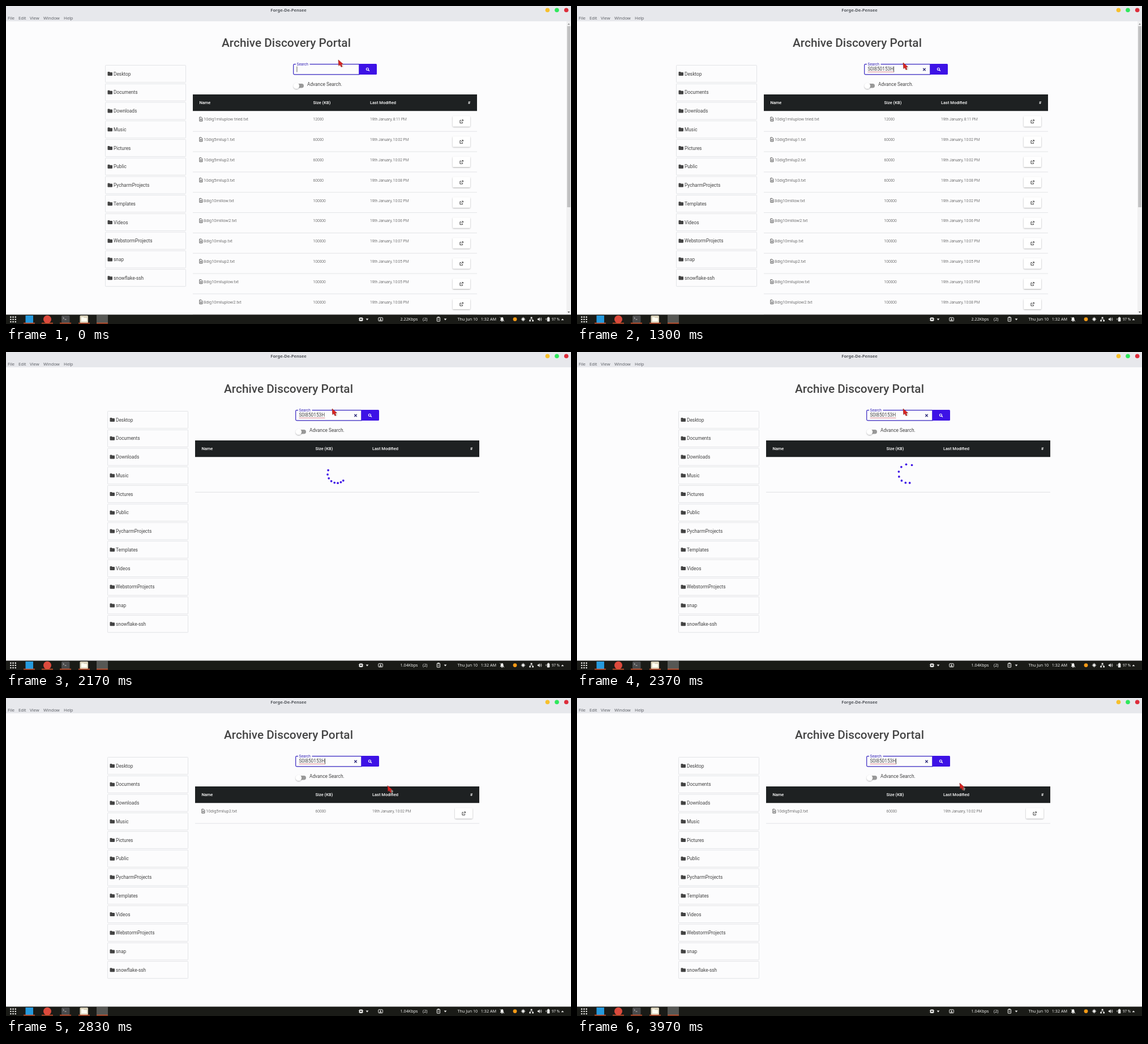
An HTML page for the animation above (4.27 s loop, 998x561 px).

```html
<!DOCTYPE html>
<html lang="en">
<head>
<meta charset="utf-8">
<title>File search</title>
<style>
  html, body { margin: 0; width: 100%; height: 100%; overflow: hidden; background: #fcfcfd; }
  svg { display: block; width: 100vw; height: 100vh; font-family: Roboto, sans-serif; }
  text { white-space: pre; }
  .sys { font-family: "Noto Sans", "Open Sans", sans-serif; }
</style>
</head>
<body>
<svg id="stage" viewBox="0 0 998 561"></svg>
<script>
const LOOP = 4270, PASTE = 1270, SEARCH = 2170, RESULT = 2500;
const INK = '#434343', BLUE = '#3d12e6', LINE = '#dcdde1';
const QUERY = 'S0I850153H';

const rect = (x, y, w, h, fill, more = '') =>
  `<rect x="${x}" y="${y}" width="${w}" height="${h}" fill="${fill}" ${more}/>`;
const circle = (x, y, r, fill, more = '') =>
  `<circle cx="${x}" cy="${y}" r="${r}" fill="${fill}" ${more}/>`;
const text = (x, y, size, str, fill = INK, more = '') =>
  `<text x="${x}" y="${y}" font-size="${size}" fill="${fill}" ${more}>${str}</text>`;
const path = (d, fill, more = '') => `<path d="${d}" fill="${fill}" ${more}/>`;
const stroke = (d, color, width = 1, more = '') =>
  path(d, 'none', `stroke="${color}" stroke-width="${width}" ${more}`);
const group = (id, body, more = '') => `<g id="${id}" ${more}>${body}</g>`;
const at = (x, y, body) => `<g transform="translate(${x} ${y})">${body}</g>`;

function windowBar() {
  const menu = [['File', 3], ['Edit', 22], ['View', 42], ['Window', 66], ['Help', 102]];
  return rect(0, 0, 998, 27, '#e7e8ec') +
    text(499, 10, 7.6, 'Forge-De-Pensee', '#55585e', 'class="sys" font-weight="700" text-anchor="middle"') +
    menu.map(([s, x]) => text(x, 24, 7.6, s, '#62656b', 'class="sys"')).join('') +
    circle(956.5, 7.2, 3.8, '#f7c02c') + circle(973, 7.2, 3.8, '#2fe85c') + circle(989.7, 7.2, 3.8, '#dd2c3a');
}

function sidebar() {
  const names = ['Desktop', 'Documents', 'Downloads', 'Music', 'Pictures', 'Public',
    'PycharmProjects', 'Templates', 'Videos', 'WebstormProjects', 'snap', 'snowflake-ssh'];
  const folder = path('M0 1q0-1 1-1h2.2l1 1h3.3q1 0 1 1v4q0 1-1 1h-6.5q-1 0-1-1z', INK);
  return names.map((name, i) => at(175, 104.5 + i * 32.73,
    rect(.5, 0, 142, 30.2, 'none', `stroke="${LINE}" stroke-width=".8" rx=".8"`) +
    at(4.5, 11.6, folder) + text(15, 18.2, 8.32, name))).join('');
}

function searchBox() {
  return stroke('M512 102.6H509.5Q507.7 102.6 507.7 104.4V119Q507.7 120.8 509.5 120.8H624V102.6H536.5', '#3524c0', 1.2) +
    text(513.5, 105.2, 6.66, 'Search', '#3524b8') +
    rect(623.5, 102, 31.5, 19, BLUE, 'rx="1.5"') +
    circle(638.4, 111.2, 2, 'none', 'stroke="#fff" stroke-width="1.1"') +
    stroke('M639.9 112.7l2 2', '#fff', 1.3) +
    group('query', text(513.4, 114.3, 8.32, QUERY) +
      stroke('M611.3 109.8l4.4 4.4m0-4.4l-4.4 4.4', '#2c2a78', 1.3)) +
    group('spell', stroke('M513.5 116.3H559.5', '#d0616b', .8)) +
    rect(0, 106.6, .7, 10, '#222', 'id="caret"') +
    rect(511, 137, 15, 7.4, '#989898', 'rx="3.7"') +
    circle(513, 140.9, 5.2, '#fff', 'filter="url(#soft)"') +
    text(532, 141.4, 8.32, 'Advance Search.');
}

function tableHead() {
  const cell = (x, s, more = '') => text(x, 172.9, 7.49, s, '#fff', `font-weight="500" ${more}`);
  return rect(330, 156, 502, 29.2, '#1e2122') + cell(341.4, 'Name') + cell(542.6, 'Size (KB)') +
    cell(643, 'Last Modified') + cell(820.4, '#', 'text-anchor="end"');
}

function tableRow(i, [name, size, time]) {
  const file = path('M.5 .5h3l2 2v5h-5z', 'none', `stroke="${INK}" stroke-width=".9"`) +
    stroke('M1.6 3.8h2.8M1.6 5.4h2.8', INK, .8);
  const open = stroke('M2.8 1.5H.7V6.3H5.3V4.2', '#333', .9) +
    stroke('M2.6 4.2L6 .8M4 .6h2.2v2.2', '#333', .9);
  const light = 'font-weight="300"';
  return at(330, 185.2 + i * 35.83,
    at(11.4, 10.4, file) + text(19, 17, 7.49, name, '#333', light) +
    text(212.6, 17, 6.65, size, '#333', light) +
    text(313, 17, 6.65, `19th January, ${time} PM`, '#333', light) +
    rect(459, 9, 31, 18.2, '#fff', 'rx="1.6" filter="url(#soft)"') + at(471.2, 15, open) +
    stroke('M0 36H502', LINE, .8));
}

function files() {
  const names = ['10dig1miluplow tried', '10dig5milup1', '10dig5milup2', '10dig5milup3', '8dig10millow',
    '8dig10millow2', '8dig10milup', '8dig10milup2', '8dig10miluplow', '8dig10miluplow2'];
  const times = ['8:11', '10:02', '10:02', '10:08', '10:02', '10:06', '10:07', '10:05', '10:05', '10:08'];
  return names.map((n, i) => [n + '.txt', i < 1 ? 12000 : i < 4 ? 60000 : 100000, times[i]]);
}

function scrollbar() {
  return rect(990, 27, 8, 517.5, '#f1f1f2') + rect(991.2, 35.5, 5.8, 319.5, '#c1c1c2') +
    path('M992 33h4l-2-2.4z', '#8a8a8a') + path('M992 539h4l-2 2.4z', '#555');
}

function taskbar() {
  const white = '#eeeeec';
  const label = (x, s, size = 7.2) => text(x, 555.4, size, s, white, 'class="sys"');
  const down = x => path(`M${x - 2.4} 551.6h4.8l-2.4 2.8z`, white);
  let dots = '';
  for (let i = 0; i < 9; i++) dots += rect(7.2 + i % 3 * 4.2, 547.6 + (i / 3 | 0) * 4.2, 2.3, 2.3, white, 'rx=".6"');
  const marks = [31, 63, 95, 128, 160].map(x => rect(x, 558.8, 20, 1.5, '#d6532c')).join('');
  const apps = rect(34.5, 546, 13.5, 13, '#259ade') + circle(73, 552.7, 7, '#dc4a3d') +
    rect(98, 546, 14.5, 13, '#4a4b4c', 'rx="1.5"') + stroke('M100.5 549l2 1.6l-2 1.6M103.5 553h3', '#ddd', .8) +
    rect(130.5, 546, 14.5, 13, '#d9d2bb', 'rx="1.5"') + path('M133 549h4l1 1.2h5v6.3h-10z', '#fffdf2') +
    rect(160, 545, 20, 15, '#565754');
  const tray =
    rect(624, 549.5, 6, 6.5, white, 'rx="1"') + stroke('M622.5 551.5h9M622.5 554h9', white, .7) +
    rect(626, 551.5, 2, 2.5, '#1a1b17') + down(638) +
    rect(657.8, 549.7, 7.6, 6, 'none', `stroke="${white}" rx="1"`) + circle(661.6, 552.5, 1.2, white) +
    stroke('M659.4 554.5h4.4', white, .7) +
    rect(761.2, 549.3, 5.4, 7, 'none', `stroke="${white}" rx=".6"`) + rect(762.4, 548.2, 3, 2, white) +
    stroke('M762.5 552h2.8M762.5 554h2.8', white, .7) + down(776) +
    path('M872.5 555.2q1.4-1 1.4-3.2q0-2.8 2.3-3q2.3.2 2.3 3q0 2.2 1.4 3.2z', white) +
    circle(876.2, 556.2, .9, white) + stroke('M872.3 549l7.7 7.6', white, .8) +
    circle(899, 552.6, 3.4, '#f59a16') +
    circle(913.5, 552.6, 2.3, white) +
    stroke('M913.5 548.8v7.6M909.7 552.6h7.6M910.9 550l5.2 5.2m0-5.2l-5.2 5.2', white, .9) +
    rect(926.7, 548.7, 2.8, 2.4, white) + rect(924.2, 554, 2.8, 2.4, white) + rect(929.2, 554, 2.8, 2.4, white) +
    stroke('M928.1 551v1.6M925.6 554v-1.4h5v1.4', white, .7) +
    path('M938.8 551.4h1.6l2.2-2.2v6.8l-2.2-2.2h-1.6z', white) +
    stroke('M943.7 551q1 1.6 0 3.2M945 549.6q2 3 0 6', white, .8) +
    rect(955.8, 549.6, 4.6, 7, white, 'rx=".8"') + rect(957, 548.6, 2.2, 1.2, white) +
    stroke('M954 551v3', white, .8) + path('M980.6 554.2h4.8l-2.4-2.8z', white);
  return rect(0, 544.5, 998, 16.5, '#1a1b17') + dots + apps + marks + tray +
    `<text id="speed" x="696.5" y="555.4" font-size="7.2" fill="${white}" class="sys"></text>` +
    label(736, '(2)') + label(797.5, 'Thu Jun 10') + label(838.8, '1:32 AM') + label(964, '97 %', 6.3);
}

const list = files();
const roller = Array.from({ length: 8 }, () => circle(0, 0, 1.85, BLUE)).join('');
const arrow = path('M2 3L10 9.5L8.5 13.5L4 12Z', '#d8d8cc', 'opacity=".6"') +
  path('M0 0L.8 10.6L3.1 8.6L5 12.6L7 11.7L5.3 7.9L8.4 7.4Z', '#dc2220', 'stroke="#7c2320" stroke-width=".6"');

document.getElementById('stage').innerHTML =
  `<defs><filter id="soft" x="-40%" y="-40%" width="180%" height="190%">
    <feDropShadow dx="0" dy="1" stdDeviation="1" flood-color="#000" flood-opacity=".32"/></filter></defs>` +
  rect(0, 0, 998, 561, '#fcfcfd') +
  group('page',
    text(495, 71.6, 20.8, 'Archive Discovery Portal', '#454545', 'font-weight="500" text-anchor="middle"') +
    sidebar() + searchBox() + tableHead() +
    group('all', list.map((f, i) => tableRow(i, f)).join('')) +
    group('loading', group('roller', roller, 'transform="translate(580.6 214.6)"') + stroke('M330 247.3H832', LINE, .9)) +
    group('found', tableRow(0, list[2]))) +
  group('scroll', scrollbar()) + windowBar() + taskbar() + group('pointer', arrow);

const el = id => document.getElementById(id);
const show = (id, on) => el(id).setAttribute('visibility', on ? 'visible' : 'hidden');

// Pointer stops: time, x, y
const moves = [
  [0, 587, 95], [30, 586, 95], [800, 584, 96], [870, 581, 97.5], [930, 578, 99], [1000, 576, 100],
  [2600, 580, 102], [2670, 596, 111], [2730, 620, 125], [2770, 645, 139], [2800, 664, 149],
  [2830, 674, 154.5], [2870, 676, 153], [3230, 676, 151], [3330, 676, 150]
];
const caretOff = [[200, 800], [2030, RESULT], [3070, 3670]];

// cubic-bezier(.5, 0, .5, 1), solved by bisection
function ease(x) {
  let a = 0, b = 1;
  for (let i = 0; i < 20; i++) {
    const s = (a + b) / 2;
    if (1.5 * s * (1 - s) + s ** 3 < x) a = s; else b = s;
  }
  return a * a * (3 - 2 * a);
}

function spin(ms) {
  [...el('roller').children].forEach((dot, i) => {
    const turn = ease((ms + 36 * (i + 1)) / 1200 % 1);
    const angle = (45 + i * 15.2) * Math.PI / 180 + turn * 2 * Math.PI;
    dot.setAttribute('cx', 16.6 * Math.cos(angle));
    dot.setAttribute('cy', 16.6 * Math.sin(angle));
  });
}

function draw(t) {
  const searched = t >= SEARCH, typed = t >= PASTE;
  el('page').setAttribute('transform', `translate(${searched ? 4 : 0} 0)`);
  show('all', !searched);
  show('scroll', !searched);
  show('loading', searched && t < RESULT);
  show('found', t >= RESULT);
  show('query', typed);
  show('spell', t >= PASTE + 30);
  show('caret', !caretOff.some(([a, b]) => t >= a && t < b));
  el('caret').setAttribute('x', typed ? 559.4 : 513.6);
  el('speed').textContent = searched ? '1.04Kbps' : '2.22Kbps';
  if (searched) spin(50 + Math.max(0, Math.floor((t - SEARCH) / 33.34) * 33.34));
  const [, x, y] = moves.filter(m => m[0] <= t).pop();
  el('pointer').setAttribute('transform', `translate(${x} ${y})`);
}

const start = performance.now();
function tick() {
  draw((performance.now() - start) % LOOP);
  requestAnimationFrame(tick);
}
tick();
</script>
</body>
</html>
```
